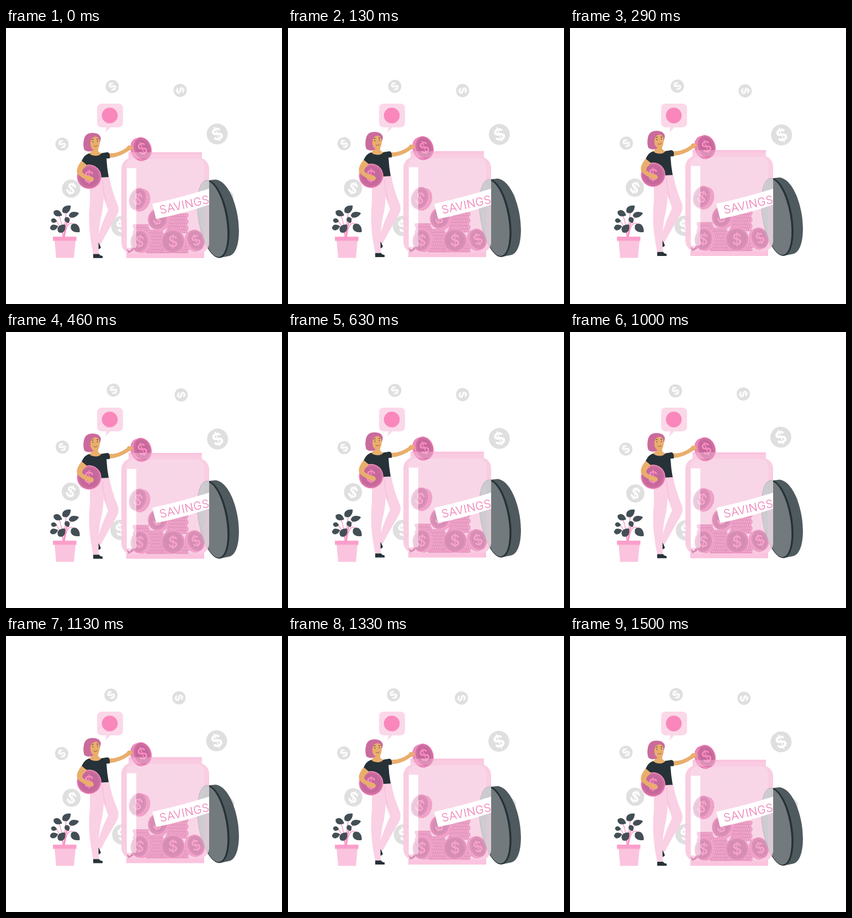
An HTML page that plays this animation: 500x500 px, repeating every 1.54 s.

```html
<!DOCTYPE html>
<html lang="en">
<head>
<meta charset="utf-8">
<title>Savings jar</title>
<style>
  html, body { margin: 0; width: 100%; height: 100%; overflow: hidden; background: #fff; }
  svg { display: block; width: 100vw; height: 100vh; }
  text { font-family: Inter, Roboto, sans-serif; }
</style>
</head>
<body>
<svg viewBox="0 0 500 500">
  <g id="wind"></g>

  <g id="plant">
    <g fill="none" stroke="#f78ec0" stroke-width="1.3">
      <path d="M104 379Q101 352 96 339M105 379Q106 350 110 331M104 379Q98 354 89 349M105 379Q107 356 111 349M106 379Q107 350 121 340M103 379Q104 368 99 363M106 379Q110 346 124 356"/>
    </g>
    <path fill="#fbc4de" d="M88 385H126L123 416.500H91Z"/>
    <rect x="85" y="378" width="42.500" height="7.500" fill="#fb9fcb"/>
  </g>

  <path fill="#fbd8e8" d="M174 137H203Q212 137 212 146V171Q212 180 203 180H189L180 189 182 180H174Q165 180 165 171V146Q165 137 174 137Z"/>
  <circle cx="188" cy="158.500" r="14.300" fill="#f987bb"/>

  <g id="float">
    <!-- lid -->
    <path fill="#4f5a5f" d="M366 276L380 274.500C405 278 422 328 422 366C422 397 414 411 404 413L387 416.500Z"/>
    <g transform="translate(375.500 346) rotate(-10)">
      <ellipse rx="27" ry="71.500" fill="#263238"/>
      <ellipse cx="-1.200" rx="24.500" ry="69.500" fill="#737a7e"/>
    </g>

    <!-- jar -->
    <rect x="218" y="406" width="141" height="10.800" fill="#fbc3de"/>
    <rect x="209" y="235" width="159" height="174" rx="20" fill="#f9cbe1" fill-opacity=".95"/>
    <rect x="218" y="237" width="141" height="168" rx="14" fill="#f9d6e7"/>
    <rect x="222" y="225" width="133" height="11.500" fill="#f9cee2"/>
    <rect x="222" y="225" width="133" height="4" fill="#f9c3dd"/>
    <circle cx="284" cy="262" r="16" fill="#dfdfdf" opacity=".1"/>
    <rect x="219" y="254" width="17" height="144" fill="#fff"/>
    <g id="pile" opacity=".66"></g>
    <rect x="219" y="254" width="17" height="144" fill="#fff" opacity=".45"/>
    <clipPath id="inside"><path d="M340 236H350Q368 240 368 258V390Q366 402 356 408H340Z"/></clipPath>
    <g clip-path="url(#inside)">
      <ellipse rx="26.500" ry="71" transform="translate(375.500 346) rotate(-10)" fill="#c6cacc" stroke="#b3b2b7" opacity=".85"/>
      <path fill="#f9cbe1" opacity=".3" d="M359 320H368V410H346Q359 400 359 386Z"/>
    </g>

    <!-- saver -->
    <g id="raised"></g>
    <rect x="222" y="225" width="133" height="11.500" fill="#f9c9e0" opacity=".4"/>
    <path fill="#263238" d="M166 383L172 398 168 401 165 397ZM158 408.500H168Q170 412.500 175 413V416.800H158Z"/>
    <path fill="#fad0e4" d="M165 269H187Q191 294 203 322Q206 332 199 343Q184 368 172 391L165 388Q168 365 185 330L174 300Z"/>
    <path fill="#fad0e4" d="M152 268H177Q179 306 174 335Q166 363 168 409.500H158Q147 358 152 318Z"/>
    <path fill="none" stroke="#f5b9d5" d="M175 276Q175 295 181 313"/>
    <path fill="#e9ae6c" d="M185 227Q203 228 218 217L221 213 228 213 230 219 223 222Q206 234 187 235.500Z"/>
    <path fill="#263238" d="M151 227Q162 231 171 227L184 225Q189 226 188 236L182 236.500Q183 254 186 270L149 272 147 249 137 241Q142 229 151 227Z"/>
    <path fill="#e9ae6c" d="M155 213H167V223Q171 227 173 227Q168 232 162 231.500Q154 231 151 227Q156 224 155 213Z"/>
    <path fill="#cb6a9c" d="M142 221Q139 213 141 203Q143 190 157 190Q170 190 172 200Q171 206 168 212L157 222Q149 226 142 221Z"/>
    <path fill="#e9ae6c" d="M153 207Q154 198 161 197Q166 196 169 202Q171 212 167 219Q163 224 156 219Q152 214 153 207Z"/>
    <g stroke="#263238" stroke-width="1" fill="none">
      <path d="M157.500 205V207M165.500 204V206M155.500 202.500L158.500 201M164 201L167 201.500"/>
      <path d="M159 213.500Q163 216 166 212.500" stroke="#a6504a"/>
    </g>
    <g id="hip"></g>
    <path fill="#e9ae6c" d="M137 240.500L147 249Q138 255 138 261Q143 267 152 268.500Q160 270 159 275.500Q155 280.500 148 276Q135 271 129 263Q126 254 137 240.500Z"/>
  </g>

  <path fill="#fff" d="M265 318.500Q317 307 368 291V320Q322 336 272 346Z"/>
  <text transform="translate(280 337) rotate(-12.500)" font-size="20.500" letter-spacing=".5" font-weight="300" fill="#f078b0">SAVINGS</text>
</svg>

<script>
const LOOP = 1540, FLOAT = 10;
const byId = id => document.getElementById(id);
const add = (id, markup) => byId(id).insertAdjacentHTML('beforeend', markup);

const dollar = (size, color, weight = 700) =>
  `<text text-anchor="middle" y="${size * .36}" font-size="${size}" font-weight="${weight}" fill="${color}">$</text>`;

const greyCoin = ([x, y, r, turn]) =>
  `<g transform="translate(${x} ${y}) rotate(${turn})"><circle r="${r}" fill="#dfdfdf"/>${dollar(r * 1.6, '#fff')}</g>`;

// A coin seen at an angle; depth shifts its ribbed edge sideways
const coin = (x, y, rx, ry, turn = 0, depth = 0) => {
  const edge = Math.abs(depth);
  return `<g transform="translate(${x} ${y}) rotate(${turn})">
    <ellipse cx="${depth}" rx="${rx}" ry="${ry}" fill="#f58fc0"/>
    <ellipse cx="${depth}" rx="${rx - edge / 2}" ry="${ry - edge / 2}" fill="none" stroke="#d06f a3" stroke-width="${edge}" stroke-dasharray="1 2.5"/>
    <ellipse rx="${rx}" ry="${ry}" fill="#f98cc0"/>
    <ellipse rx="${rx - 1.5}" ry="${ry - 1.5}" fill="#c5689b"/>
    <ellipse rx="${rx - 3.5}" ry="${ry - 3.5}" fill="none" stroke="#e07fb0" stroke-width=".8"/>
    ${dollar(ry * 1.3, '#f98cc0', 500)}
  </g>`.replace('#d06f a3', '#d06fa3');
};

const stack = (x, bottom, width, count) => Array.from({ length: count }, (_, i) => {
  const y = bottom - 6 * (i + 1), left = x + (i % 2) * 2;
  return `<rect x="${left}" y="${y}" width="${width}" height="5.5" rx="1" fill="#f58fc0" stroke="#c5689b" stroke-width=".8"/>
    <path d="M${left + 2} ${y + 3}h${width - 4}" stroke="#c5689b" stroke-width="4" stroke-dasharray="1 2.4"/>`;
}).join('');

add('wind', [
  [192.5, 106, 12, -40], [315.5, 113, 12, 80], [382.5, 192, 19, -22],
  [101.5, 210.5, 12, -40], [118, 291, 16.5, 22], [209, 359, 18.5, -15], [400, 307, 12.5, 10]
].map(greyCoin).join(''));

const leaves = [
  [110, 328, 9.5, 6, -40], [94, 336, 8.5, 5.5, 25], [87, 349, 5.5, 4, 10], [87, 361, 7.5, 5, -15],
  [101, 363, 9, 6.5, -50], [123, 338, 9.5, 5, -15], [111, 348, 6, 4.5, 65], [126, 363, 10, 7, 40]
];
add('plant', leaves.map(([x, y, a, b, turn]) =>
  `<path transform="translate(${x} ${y}) rotate(${turn})" fill="#434f55" d="M${-a} 0C${-a * .7} ${-b * 1.4} ${a * .3} ${-b * 1.3} ${a} 0C${a * .3} ${b * 1.3} ${-a * .7} ${b * 1.4} ${-a} 0Z"/>`).join(''));

add('pile',
  coin(239, 310, 16, 21, 20, 6) +
  stack(290, 372, 38, 6) + stack(230, 374, 28, 3) + stack(254, 408, 30, 7) +
  stack(282, 408, 48, 4) + coin(275, 346, 18, 20, 20, 5) +
  '<path fill="#c5689b" d="M218 400L224 404 229 398 231 403 222 408Z"/>' +
  coin(242, 386.5, 16.5, 20.5, 8, 5) + coin(302.5, 386.5, 21.5, 21.5) + coin(344, 384.5, 16, 20, -22, -4));
add('raised', coin(247, 218.5, 16.5, 21.5, -20, -5));
add('hip', coin(150.5, 269.5, 22, 22));

const sway = p => p < .25 ? 4 * p : p < .75 ? 2 - 4 * p : 4 * p - 4;

function draw(now) {
  const p = now % LOOP / LOOP;
  byId('wind').setAttribute('transform', `rotate(${sway(p)} 250 250)`);
  byId('float').setAttribute('transform', `translate(0 ${-FLOAT * (1 - Math.abs(1 - 2 * p))})`);
  requestAnimationFrame(() => draw(performance.now() - start));
}
const start = performance.now();
draw(0);
</script>
</body>
</html>
```
